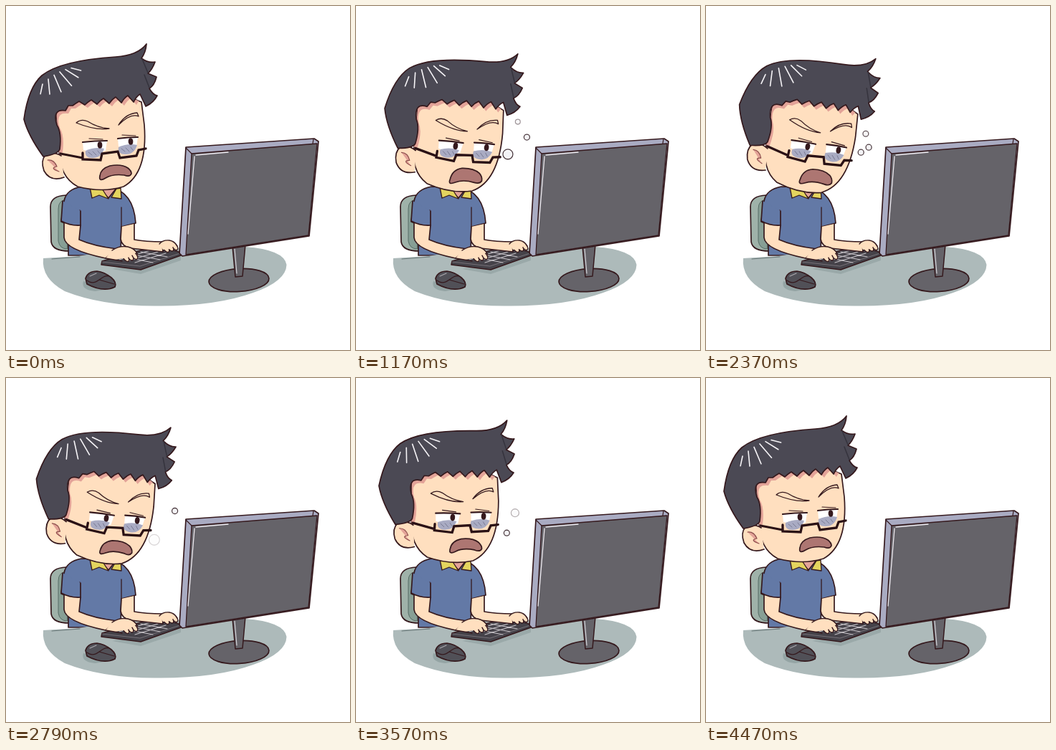
Write an HTML page with a canvas that moves like this. It is 480 by 480 pixels and loops after 4.5 s.

```html
<!DOCTYPE html>
<html lang="en">
<head>
<meta charset="utf-8">
<title>Tired at the desk</title>
<style>
html, body { margin: 0; width: 100%; height: 100%; overflow: hidden; background: #fff; }
canvas { display: block; width: 100vw; height: 100vh; }
</style>
</head>
<body>
<canvas id="stage" width="480" height="480"></canvas>
<script>
const ctx = document.getElementById('stage').getContext('2d');
const LOOP = 4500, STEP = 30, TAU = Math.PI * 2;
const INK = '#35191d', SKIN = '#ffdfbf', BLUSH = '#e3a398', HAIR = '#4b4954';
const SHIRT = '#6379a6', SCREEN = '#656369', LILAC = '#a9abc2', DARK = '#454249';

function shape(d, fill, line = INK, width = 1.7) {
  const path = typeof d === 'string' ? new Path2D(d) : d;
  if (fill) { ctx.fillStyle = fill; ctx.fill(path); }
  if (line) { ctx.strokeStyle = line; ctx.lineWidth = width; ctx.stroke(path); }
}

function oval(x, y, rx, ry, fill, line, width, tilt = 0) {
  const path = new Path2D();
  path.ellipse(x, y, rx, ry, tilt, 0, TAU);
  shape(path, fill, line, width);
}

function repeat(count, draw) {
  return Array.from({ length: count }, (_, i) => draw(i)).join('');
}

const mix = (a, b, k) => a + (b - a) * k;

// 0 to 1 to 0 around a centre time.
function bump(t, centre, reach) {
  const k = Math.max(0, 1 - Math.abs(t - centre) / reach);
  return k * k * (3 - 2 * k);
}

// The head is upright at each of these times and nods in between.
const UPRIGHT = [0, 1680, 3355, 4475];
function nodAngle(t) {
  const i = UPRIGHT.findIndex(end => t < end);
  if (i < 1) return 0;
  const k = (t - UPRIGHT[i - 1]) / (UPRIGHT[i] - UPRIGHT[i - 1]);
  return (1 - Math.cos(k * TAU)) * Math.PI * 7 / 180;
}

const FACE = 'M70 145L74 200Q74 238 100 252Q135 261 164 252Q198 233 193 166L189 134L150 118L90 125Z';

// Zigzag fringe, running from right to left.
const FRINGE = repeat(6, i =>
  `L${187 - 17 * i} ${123 + 2 * i}Q${182 - 17 * i} ${126 + 2 * i} ${178 - 17 * i} ${134 + i}`);
const HAIRDO = 'M196 53Q195 65 189 73Q199 80 208 78Q204 89 198 94L210 99Q207 111 200 115Q205 124 211 125Q206 135 195 140'
  + FRINGE + 'L87 139L83 146Q64 143 71 166Q78 177 75 200Q72 207 52 210'
  + 'Q31 181 25 158Q31 114 50 97Q76 76 153 71Q184 69 196 53Z';

function chairAndBody() {
  shape('M84 264Q62 265 62 280L63 329Q65 342 88 342Z', '#9fb2a9');
  shape('M86 270Q73 270 73 283V328Q75 339 85 339Z', '#879f95', '#566c66', 1);
  shape('M105 252Q84 256 81 272L77 301L87 305V348H160L161 308L181 303Q178 259 145 253Z', SHIRT);
  shape('M89 306L100 308L98 331L89 327Z', '#465b86', null);
  shape('M161 281V309M103 285V309', null, INK, 1.3);
  shape('M129 253L143 268L155 253Z', BLUSH);
  shape('M117 253L120 268L130 264L143 269L134 255Z', '#e4d45e', INK, 1.3);
  shape('M154 255L147 267L161 269L160 254Z', '#e4d45e', INK, 1.3);
}

function table() {
  shape('M52 352Q49 380 82 398Q135 419 211 418.5Q293 419 345 400Q391 384 391.5 361Q388 340 334 336L160 339L101 349Z', '#adbaba', null);
  shape('M64 353L103 350', null, '#657474', 1);
  shape('M108 384Q104 396 124 398L151 394Z', '#94a4a4', null);
  shape('M148 367L188 374L244 355V349Z', '#9aa9a9', null);
}

function keyboard() {
  shape('M134 356L213 334L244 344V348L188 368L133 361Z', DARK, INK, 1.5);
  shape('M134 357L187 363L243 345', null, '#777279', 1);
  const rows = repeat(3, i => `M${168 + 10 * i} ${351 - 4 * i}l37 7`);
  const columns = repeat(3, i => `M${158 + 11 * i} ${354 + 2 * i}l43 -13`);
  shape(rows + columns, null, '#c9c5ca', 1.1);
}

function fingers(x, y, slope) {
  for (let i = 2; i >= 0; i--) {
    oval(x + 6 * i, y - slope * i, 6.5, 3.2, SKIN, INK, 1.3, .9);
  }
}

function arms(lift) {
  shape('M161 308L160 325Q161 335 174 338L219 343L218 329Q195 329 179 326V304', SKIN);
  fingers(223, 338, 1.5);
  shape('M214 332Q219 326 228 327Q235 328 237 333L229 339L219 340', SKIN, null);
  shape('M214 332Q219 326 228 327Q235 328 239 335', null, INK, 1.4);

  const wrist = 352 - 6 * lift;
  shape(`M81 303V323Q82 340 139 ${wrist}L155 ${wrist - 13 - 4 * lift}Q122 ${335 - 2 * lift} 102 326L104 306`, SKIN);
  ctx.save();
  ctx.translate(0, -15 * lift);
  fingers(167, 351, 1.5);
  shape('M148 341Q158 334 170 336Q180 338 182 344L170 351L152 354L139 352', SKIN, null);
  shape('M148 341Q158 334 170 336Q180 338 184 347M139 352L162 356', null, INK, 1.4);
  ctx.restore();
  shape('M79 272L77 300Q90 307 104 306V286', SHIRT);
}

function mouse() {
  shape('M111 380Q114 370 127 370Q137 371 147 379Q155 386 152 392Q136 400 113 388Z', '#515057');
  shape('M113 383Q121 389 130 382T143 377M130 382L151 388', null, INK, 1.2);
  shape('M117 377L126 373', null, '#aaa7ad', 1.2);
}

function monitor() {
  oval(325, 382.5, 42, 16, SCREEN, INK, 1.7, -.06);
  shape('M316 336L334 333L330 377L320 378Z', SCREEN, INK, 1.5);
  shape('M319 339L322 373', null, '#d5d2d8', 1.2);
  shape('M251 197L430 185L436 189L423 321L246 349L242 345Z', LILAC);
  shape('M259 206L434 192L422 320L251 347Z', SCREEN, INK, 1.3);
  shape('M251 198L259 206M429 186L428 192', null, INK, 1.2);
  shape('M263 210L254 318M265 208L310 204', null, '#eeeaf0', 1.3);
}

function eye(x, y, half, pupil) {
  ctx.save();
  ctx.translate(x, y);
  const lid = `M${-half} 0Q0 -2 ${half} -2`;
  shape(`${lid}L${half - 2} 12Q0 16 ${1 - half} 11Z`, '#fff', null);
  shape('M-13 12Q0 6 13 9Q9 22 -3 22T-13 12Z', '#a9abc3', null);
  shape('M-9 14l5 4M-3 13l5 5M4 12l3 4', null, '#777891', .9);
  oval(pupil, 4, 2.5, 4, INK);
  shape(lid, null, INK, 2.2);
  shape('M-8 -5L11 -4', null, INK, 1.2);
  ctx.restore();
}

function shine() {
  const streaks = repeat(6, i => {
    const angle = (102 - 17.5 * i) * Math.PI / 180;
    const length = 14 + 12 * Math.sin(i / 5 * Math.PI);
    return `M${51 + 8 * i} ${109 - 7.5 * i + .6 * i * i}l${length * Math.cos(angle)} ${length * Math.sin(angle)}`;
  });
  shape(streaks, null, '#f6f4f7', 1.6);
}

function glasses() {
  ctx.lineJoin = 'miter';
  shape('M76 206L107 212M107 205V214L132 215L134 206L156 203L159 212L182 209L185 201L195 199', null, '#2a1115', 3.3);
  ctx.lineJoin = 'round';
}

function mouth(t) {
  const open = Math.max(bump(t, 1150, 560), bump(t, 2450, 600), bump(t, 3150, 600), .5 * bump(t, 3990, 450));
  const low = 4 * open;
  shape(`M131 ${237 + low}Q132 227 145 223Q161 220 170 226Q175 230 175 ${234 + low / 2}Q173 ${239 + low / 2} 165 ${236 + low}Q149 ${234 + low} 139 ${240 + low}T131 ${237 + low}Z`, '#ad7672');
}

function head(t) {
  ctx.save();
  ctx.translate(126, 243);
  ctx.rotate(nodAngle(t));
  ctx.translate(-126, -243);

  shape(FACE, SKIN);
  ctx.save();
  ctx.clip(new Path2D(FACE));
  ctx.translate(4, 4);
  shape(HAIRDO, BLUSH, null);
  ctx.restore();

  shape('M77 209Q65 202 55 208Q48 216 53 230Q62 246 81 239', SKIN);
  shape('M58 215Q67 214 71 224Q60 226 74 231', BLUSH, '#8b4d4b', 1.2);
  shape(HAIRDO, HAIR);
  shape('M190 74L198 93M193 96L200 114', null, '#35333d', 1.5);
  shine();
  eye(124, 190, 17, 7);
  eye(170, 185, 14, 4);
  shape('M98 163Q105 157 114 161Q128 170 144 171Q125 174 98 163Z', SKIN, INK, 1.3);
  shape('M157 166Q167 150 183 149L185 154Q174 149 157 166Z', SKIN, INK, 1.3);
  glasses();
  mouth(t);
  ctx.restore();
}

const BUBBLES = [
  { born: 300, gone: 1250, from: [204, 226], to: [226, 161], size: [3.5, 3.4] },
  { born: 600, gone: 1800, from: [235, 217], to: [240, 167], size: [4, 4] },
  { born: 900, gone: 2500, from: [208, 217], to: [223, 178], size: [7, 3] },
  { born: 1560, gone: 3450, from: [204, 229], to: [241, 178], size: [4, 4] },
  { born: 2220, gone: 2760, from: [209, 219], to: [226, 184], size: [4, 4] },
  { born: 2760, gone: 3630, from: [206, 228], to: [222, 188], size: [7.4, 5] },
  { born: 3060, gone: 4200, from: [200, 233], to: [216, 207], size: [4, 3.3] }
];

function bubbles(t) {
  for (const { born, gone, from, to, size } of BUBBLES) {
    if (t <= born || t >= gone) continue;
    const k = (t - born) / (gone - born), eased = Math.sin(k * Math.PI / 2);
    const x = mix(from[0], to[0], eased), y = mix(from[1], to[1], eased);
    const r = mix(size[0], size[1], k ** 3);
    ctx.globalAlpha = Math.min(1, (t - born) / 150, (gone - t) / 150);
    oval(x, y, r, r, '#fff', '#4c3b41', 1.3);
    oval(x, y, r * .65, r * .65, '#f3f3f6', null);
  }
  ctx.globalAlpha = 1;
}

function draw(t) {
  ctx.fillStyle = '#fff';
  ctx.fillRect(0, 0, 480, 480);
  ctx.lineCap = ctx.lineJoin = 'round';
  chairAndBody();
  table();
  keyboard();
  arms(bump(t, 1770, 170));
  mouse();
  monitor();
  head(t);
  bubbles(t);
}

function tick() {
  const t = performance.now() % LOOP;
  draw(Math.floor(t / STEP) * STEP);
  requestAnimationFrame(tick);
}
tick();
</script>
</body>
</html>
```
